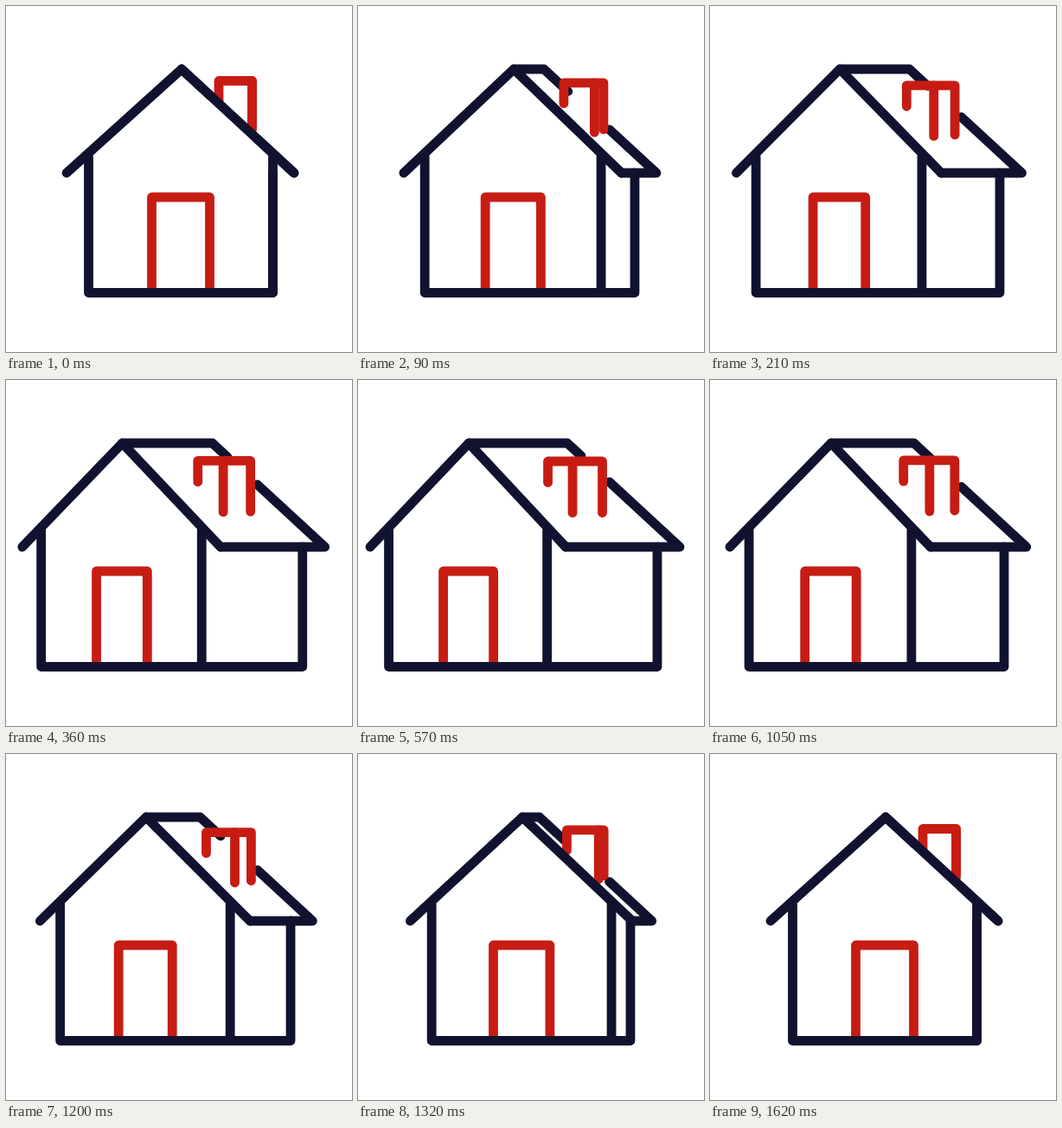
An HTML page with a canvas for the animation above (2.65 s loop, 400x400 px).

```html
<!DOCTYPE html>
<html lang="en">
<head>
<meta charset="utf-8">
<title>Turning house</title>
<style>
  html, body { margin: 0; width: 100%; height: 100%; overflow: hidden; background: #fff; }
  canvas { display: block; width: 100vmin; height: 100vmin; }
</style>
</head>
<body>
<canvas id="stage" width="400" height="400"></canvas>
<script>
const ctx = document.getElementById('stage').getContext('2d');
const NAVY = '#11122f', RED = '#c71c14';
const LOOP = 2650, STEP = 30, TURN = 600, BACK = 1620;

// Cubic bezier easing with flat ends: (x1, 0) and (x2, 1)
function ease(x, x1, x2) {
  if (x <= 0) return 0;
  if (x >= 1) return 1;
  let lo = 0, hi = 1, t;
  for (let i = 0; i < 30; i++) {
    t = (lo + hi) / 2;
    const u = 1 - t;
    if (3 * u * u * t * x1 + 3 * u * t * t * x2 + t * t * t < x) lo = t;
    else hi = t;
  }
  return t * t * (3 - 2 * t);
}

// 0 = front view, 1 = fully turned
function turnAt(ms) {
  if (ms < TURN) return ease(ms / TURN, 0.17, 0.1);
  return 1 - ease((ms - TURN) / (BACK - TURN), 0.866, 0.405);
}

function line(color, ...pts) {
  ctx.strokeStyle = color;
  ctx.beginPath();
  pts.forEach(([x, y]) => ctx.lineTo(x, y));
  ctx.stroke();
}

function draw(p) {
  const mix = (a, b) => a + (b - a) * p;
  const top = 73, eave = 193, floor = 331.5, wallTop = 174;
  const apex = mix(203, 128), ridge = mix(203, 242);
  const eaveL = mix(70, 14), eaveR = mix(333, 240), eaveFar = mix(333, 372);
  const wallL = mix(95.5, 35.5), wallM = mix(308.5, 218.5), wallR = mix(308.5, 346);
  const doorL = mix(168.5, 98.5), doorR = mix(235.5, 156.5);
  const slope = x => [x, top + (x - ridge) * (eave - top) / (eaveFar - ridge)];

  ctx.fillStyle = '#fff';
  ctx.fillRect(0, 0, 400, 400);
  ctx.lineWidth = 10.8;
  ctx.lineCap = ctx.lineJoin = 'round';

  // Far side of the roof, broken behind the chimney
  line(NAVY, [apex, top], [ridge, top], slope(mix(236, 258)));
  line(NAVY, slope(290.5), [eaveFar, eave], [eaveR, eave]);

  // Chimney
  const cap = mix(86.5, 94), front = mix(284.5, 248);
  line(RED, [mix(246, 219.5), mix(110, 118.5)], [mix(246, 219.5), cap],
    [mix(284.5, 282.5), cap], [mix(284.5, 282.5), mix(138, 153.5)]);
  line(RED, [front, cap], [front, mix(143, 153.5)]);

  // Door
  line(RED, [doorL, floor - 2], [doorL, 221], [doorR, 221], [doorR, floor - 2]);

  // Walls and front gable
  line(NAVY, [wallL, wallTop], [wallL, floor], [wallR, floor], [wallR, eave]);
  line(NAVY, [wallM, wallTop], [wallM, floor]);
  line(NAVY, [eaveL, eave], [apex, top], [eaveR, eave]);
}

function tick() {
  const ms = performance.now() % LOOP;
  draw(turnAt(Math.floor(ms / STEP) * STEP));
  requestAnimationFrame(tick);
}
tick();
</script>
</body>
</html>
```
